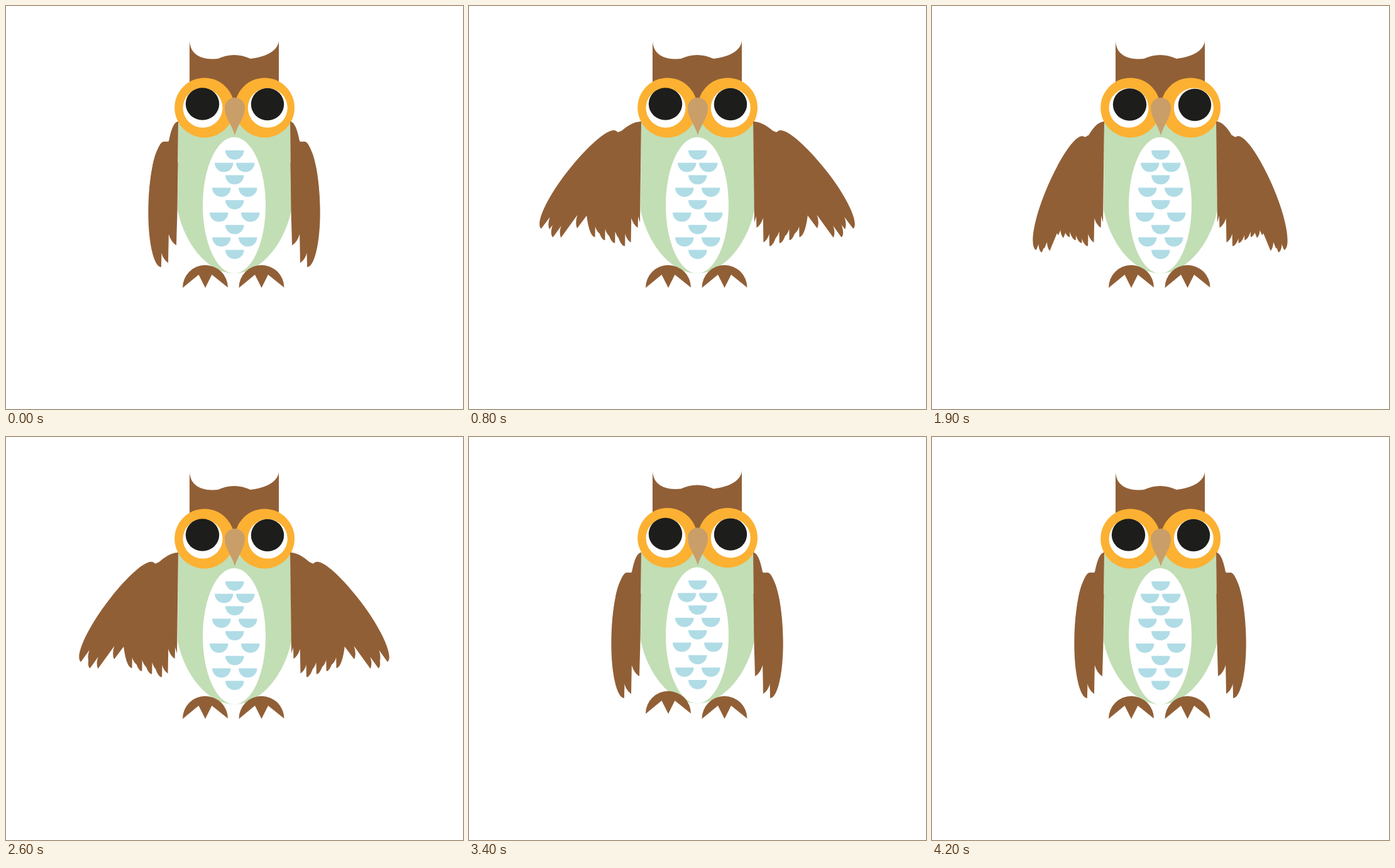
Write an HTML page that moves like this. It is 727 px wide and 642 px high and loops after 7200 ms.

```html
<!DOCTYPE html>
<html lang="en">
<head>
<meta charset="utf-8">
<title>Owl</title>
<style>
html, body { margin: 0; width: 100%; height: 100%; overflow: hidden; background: #fff; }
svg { display: block; width: 727px; height: 642px; }
.brown { fill: #915f36; }
.ring { fill: #fcb132; }
.white { fill: #fff; }
.green { fill: #c2deb5; }
.scale { fill: #b0dce6; }
.pupil { fill: #1d1d1b; }
.beak { fill: #c99e69; }
</style>
</head>
<body>
<svg viewBox="0 0 727 642">
  <defs>
    <path id="foot" d="M281 449A36 36 0 0 1 353 448.500L327.500 428L317 449L306.500 428Z"/>
    <path id="blade" d="M0 0C-14 2 -22 55 -22 103C-22 155 -12 196 0 196L0 173Q3 184 11 189L11 143Q15 156 23.500 161L24 120V30L10 0Z"/>
    <g id="wing"><path id="shoulder"/></g>
  </defs>
  <g id="torso">
    <path class="green" d="M274 180L273 325C283 375 318 425 363 426C408 425 444 375 454 325L452 180Z"/>
    <ellipse class="white" cx="363" cy="317.500" rx="50" ry="108.500"/>
    <path class="scale" id="scales"/>
    <path class="brown" d="M292 54C292 75 308 87 337 84Q363 72 389 84C415 81 434 70 434 54V150H292Z"/>
    <circle class="ring" cx="315.700" cy="162" r="47.500"/>
    <circle class="ring" cx="411.500" cy="162" r="47.500"/>
    <circle class="white" cx="313" cy="162.300" r="31.500"/>
    <circle class="white" cx="416.300" cy="162.300" r="31.500"/>
    <g class="pupil" id="pupils">
      <ellipse cx="312.500" cy="156" rx="26.700" ry="25.800"/>
      <ellipse cx="416" cy="156.500" rx="26.200" ry="25.700"/>
    </g>
    <path class="beak" d="M364 206C360 190 348 178 348 162A16 16 0 0 1 380 162C380 178 368 190 364 206Z"/>
  </g>
  <g class="brown">
    <use href="#foot" id="footL"/>
    <use href="#foot" id="footR"/>
    <use href="#wing"/>
    <use href="#wing" transform="matrix(-1 0 0 1 726 0)"/>
  </g>
</svg>
<script>
const $ = id => document.getElementById(id);
const LAST = 42;     // tenth of a second at which the owl comes to rest
const STOP = .785;   // spread at which all but the leading blade stop
const INNER = 4;

// Key points of the wing beat: tenth of a second, spread from 0 to 1.
const beat = [
  [0, 0], [6, 1], [7, 1], [9, .63], [11, .75], [12, .75], [13, 1],
  [19, .48], [21, .05], [24, 1], [25, 1], [26, STOP], [27, STOP],
  [33, 0], [37, 0], [39, .48], [LAST, 0]
];

function spreadAt(tick) {
  const i = Math.max(1, beat.findIndex(key => key[0] >= tick));
  const [t0, a0] = beat[i - 1], [t1, a1] = beat[i];
  return a0 + (a1 - a0) * (tick - t0) / (t1 - t0);
}

// Triangular pulse of height 1.
const pulse = (x, centre, reach) => Math.max(0, 1 - Math.abs(x - centre) / reach);

const move = (el, x, y, turn = 0, size = 1) =>
  el.setAttribute('transform', `translate(${x} ${y}) rotate(${turn}) scale(${size})`);

const blades = Array.from({ length: INNER + 2 }, () => {
  const el = document.createElementNS('http://www.w3.org/2000/svg', 'use');
  el.setAttribute('href', '#blade');
  return $('wing').appendChild(el);
});

// All blades lie stacked when folded and fan out as the wing spreads.
function poseWing(a) {
  const root = s => [250 - 20 * s, 220 - 26 * s];
  const turn = s => .9 + 44.7 * s;
  const held = Math.min(a, STOP), open = held / STOP;
  const [x, y] = root(a), [hx, hy] = root(held);
  const [lead, second, ...inner] = blades;

  move(lead, x, y, turn(a));
  move(second, hx + 11 * open, hy + 15 * open, turn(held), .97);
  inner.forEach((el, k) => move(el, 251 - 16 * k * open, 216 + 3 * k, 1, .85 - .04 * k));
  $('shoulder').setAttribute('d',
    `M274 184Q${265 - 6 * a} 184 ${x + 9} ${y - 5 + 6 * a}L${x - 3} ${y + 5}L272 345Z`);
}

function scalePath() {
  let d = '';
  for (let row = 0; row < 9; row++) {
    const gap = 25 - 2 * Math.abs(row - 5);
    for (const shift of row % 2 ? [-gap, gap] : [0]) {
      d += `M${349 + shift} ${230 + 19.8 * row}h29.500a14.750 14.750 0 0 1 -29.500 0z`;
    }
  }
  return d;
}

let shown = -1;
function draw() {
  const tick = Math.min(Math.floor(performance.now() % 7200 / 100), LAST);
  if (tick !== shown) {
    shown = tick;
    const a = spreadAt(tick);
    const left = pulse(tick, 34, 2), right = pulse(tick, 37, 2);
    const glance = pulse(a, .48, .3);
    poseWing(a);
    move($('pupils'), 2 * glance, glance);
    move($('footL'), 0, -8 * left);
    move($('footR'), 89.5, -8 * right);
    move($('torso'), 0, -1.4 * Math.max(left, right));
  }
  requestAnimationFrame(draw);
}

$('scales').setAttribute('d', scalePath());
draw();
</script>
</body>
</html>
```
